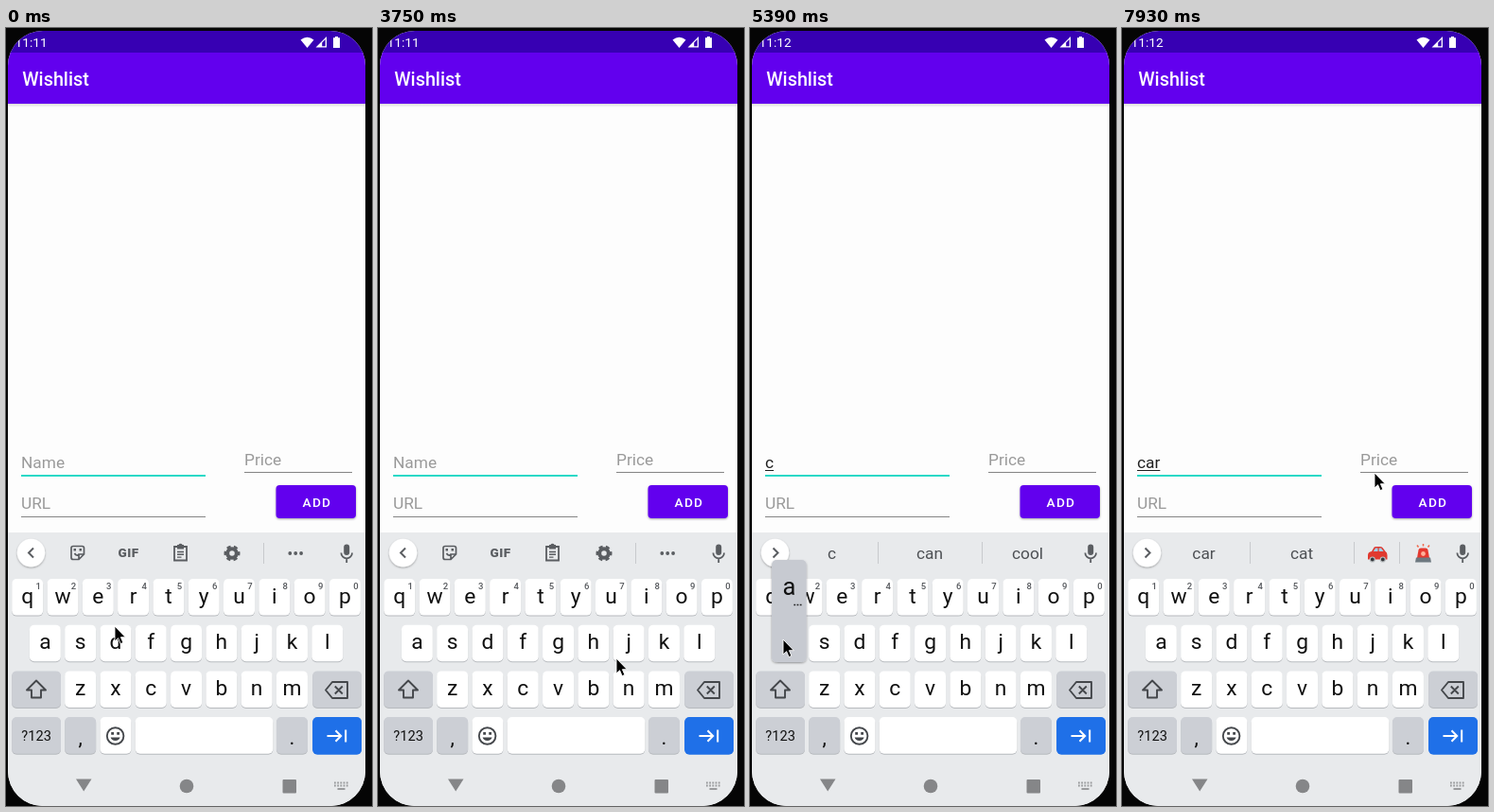
Write an HTML page that moves like this. It is 387 by 822 pixels and loops after 8000 ms.

```html
<!DOCTYPE html>
<html lang="en">
<head>
<meta charset="utf-8">
<title>Wishlist</title>
<style>
  html, body { margin: 0; width: 100%; height: 100%; overflow: hidden; background: #050505; }
  svg { display: block; width: 387px; height: 822px; font-family: Roboto, sans-serif; }
  .hint { fill: #9a9a9a; font-size: 17.3px; }
  .mid { text-anchor: middle; }
  .line { fill: none; stroke: #5a5d61; }
  .solid { fill: #5a5d61; }
  .word { fill: #4d5054; font-size: 17.3px; text-anchor: middle; }
</style>
</head>
<body>
<svg viewBox="0 0 387 822">
  <defs>
    <clipPath id="screen"><rect x="2" y="3" width="378" height="819" rx="37"/></clipPath>
    <linearGradient id="shade" x2="0" y2="1">
      <stop offset="0" stop-color="#000" stop-opacity=".13"/>
      <stop offset="1" stop-color="#000" stop-opacity="0"/>
    </linearGradient>
    <filter id="soft" x="-30%" y="-30%" width="160%" height="160%">
      <feDropShadow dx="0" dy="1" stdDeviation="1.2" flood-opacity=".35"/>
    </filter>
  </defs>
  <rect width="387" height="822" fill="#050505"/>
  <g clip-path="url(#screen)">
    <rect y="3" width="387" height="819" fill="#fdfdfd"/>
    <rect y="80" width="387" height="4" fill="url(#shade)"/>
    <rect y="3" width="387" height="23" fill="#3700b3"/>
    <rect y="26" width="387" height="54" fill="#6200ee"/>
    <g fill="#fff">
      <text id="clock" x="9.5" y="20" font-size="13.7"></text>
      <path d="M311.5 12.4Q318.5 7 325.5 12.4L318.5 21Z"/>
      <path d="M327.5 20.5L339 9V20.5ZM334.2 15.4V19.2H337.7V12Z" fill-rule="evenodd"/>
      <path d="M346 10.2H348V9H351V10.2H353V21H346Z"/>
      <text x="17.2" y="61" font-size="19.8" font-weight="500">Wishlist</text>
    </g>

    <g class="hint">
      <text id="nameHint" x="16" y="465">Name</text>
      <text x="252" y="462">Price</text>
      <text x="16" y="508">URL</text>
    </g>
    <text id="typed" x="16" y="465" font-size="17.3" fill="#202020"></text>
    <rect id="under" x="16" y="467" height="1" fill="#202020"/>
    <rect x="16" y="472" width="195" height="2" fill="#2bd9c7"/>
    <path d="M252 469.5H366M16 516.5H211" stroke="#858585"/>
    <rect id="caret" y="446" width="2" height="24" fill="#2bd0be"/>
    <rect x="285.5" y="483" width="84.5" height="35" rx="4" fill="#6200ee" filter="url(#soft)"/>
    <text x="313.6" y="506" font-size="13.7" font-weight="500" letter-spacing="1.2" fill="#fff">ADD</text>

    <rect y="533" width="387" height="289" fill="#e8eaec"/>
    <g id="toolbar">
      <path class="line" d="M77 561.5H71Q69 561.5 69 559.5V549.5Q69 547.5 71 547.5H80.5Q82.5 547.5 82.5 549.5V556ZV556H82.5M72.5 555Q74.5 558.5 77.5 556" stroke-width="1.7"/>
      <path class="solid" d="M71.5 550H74V552.5H71.5ZM77.5 550H80V552.5H77.5Z"/>
      <text class="solid mid" x="129.6" y="559" font-size="13.5" font-weight="900" letter-spacing=".5">GIF</text>
      <path class="line" d="M178 548H191V562.5H178Z" stroke-width="1.8"/>
      <path class="solid" d="M181 546H182.5A2.2 2.2 0 0 1 186.5 546H188V550.5H181Z"/>
      <path class="line" d="M181 553.5H188M181 556.3H188M181 559.1H185.5" stroke-width="1.4"/>
      <circle class="line" cx="239" cy="555" r="4.8" stroke-width="4"/>
      <circle class="line" cx="239" cy="555" r="7.2" stroke-width="2.6" stroke-dasharray="4.2 3.34" stroke-dashoffset="2.1"/>
      <path d="M272.5 544V566" stroke="#c8cacd"/>
      <path class="line" d="M300.3 555H313" stroke-width="3.8" stroke-linecap="round" stroke-dasharray="0 5.9"/>
    </g>
    <g id="words"></g>
    <circle cx="26.5" cy="554.5" r="14.7" fill="#fff" filter="url(#soft)"/>
    <path id="chevron" class="line" d="M24.5 549.5L29.5 554.5L24.5 559.5" stroke-width="2"/>
    <rect class="solid" x="357.2" y="545.5" width="6" height="11.5" rx="3"/>
    <path class="line" d="M354.4 554.5A5.8 5.8 0 0 0 366 554.5M360.2 560.5V565" stroke-width="1.8"/>

    <g id="keys"></g>
    <g fill="none" stroke="#44474b" stroke-width="1.9" stroke-linejoin="round">
      <path d="M32 689.5L42 699.5H37V707.5H27V699.5H22Z"/>
      <path d="M345 691H361V708H345L338 699.5ZM347.8 695.5L355.8 703.5M355.8 695.5L347.8 703.5"/>
      <circle cx="115.6" cy="748" r="8.8"/>
    </g>
    <path d="M111.2 744H114V746.8H111.2ZM117.2 744H120V746.8H117.2ZM110.6 749.6H120.6A5.2 4.8 0 0 1 110.6 749.6Z" fill="#44474b"/>
    <path d="M339.5 748H354M348.5 742.3L354.2 748L348.5 753.7M359.2 741.5V754.5" fill="none" stroke="#fff" stroke-width="2"/>

    <g fill="#858688">
      <path d="M74 793.5H90.5L82.2 806.5Z"/>
      <circle cx="191" cy="801" r="7.3"/>
      <rect x="292.5" y="794" width="14.5" height="14.5" rx="1"/>
    </g>
    <g stroke="#9a9b9d" stroke-width="1.8">
      <path d="M347 797.5H362M347 800.5H362" stroke-dasharray="1.8 1.4"/>
      <path d="M350.5 804H358.5"/>
    </g>

    <g id="popup">
      <rect x="-18.3" width="36.6" height="108" rx="5" fill="#c7cad1" filter="url(#soft)"/>
      <text id="popLetter" class="mid" y="37" font-size="25.5" fill="#101010"></text>
      <path d="M5 47.5H13.4" stroke="#222" stroke-width="1.6" stroke-dasharray="1.8 1.4"/>
    </g>
  </g>
  <path id="mouse" d="M0 0V16L3.6 12.7L6.1 18.6L8.9 17.4L6.4 11.7H11.3Z" stroke="#fff" stroke-width=".9"/>
</svg>
<script>
const $ = id => document.getElementById(id);
const LOOP = 8000, FRAME = 149.5;   // the screen refreshes once per FRAME ms
const LEFT = 6.2, PITCH = 37.3, TOP = 582, ROW = 48.7, KEY = 33;
const rows = ['qwertyuiop', 'asdfghjkl', 'zxcvbnm'];
const indent = [0, 0.5, 1.5];

// Pointer rests: refresh number, x, y
const path = [
  [0, 115, 632], [3, 189, 632], [8, 107, 636], [10, 107, 636], [15, 161, 656],
  [18, 163, 656], [21, 254, 644], [24, 300, 652], [30, 142, 697], [32, 142, 697],
  [36, 35, 646], [37, 35, 646], [41, 139, 600], [47, 139, 600], [50, 257, 483],
  [52, 257, 483], [53, 267, 470]
];

const typing = 'car', presses = [30, 36, 46];

const word = (x, s, weight = 400) =>
  `<text class="word" x="${x}" y="561" font-weight="${weight}">${s}</text>`;
const bar = x => `<path d="M${x}.5 543V566" stroke="#c8cacd"/>`;
const pair = (a, b, weight) => word(86.5, a) + bar(135) + word(190, b, weight) + bar(245);

const tin = `<path d="M288 549V563Q294.5 568 301 563V549Z" fill="#f0b93a"/>
  <path d="M288 553Q294.5 557 301 553V560Q294.5 564 288 560Z" fill="#f7d774"/>
  <circle cx="294.5" cy="559" r="2.2" fill="#d8402f"/>
  <path d="M288 563Q294.5 567.5 301 563" fill="none" stroke="#aeb4b8" stroke-width="1.6"/>
  <ellipse cx="294.5" cy="548.5" rx="6.7" ry="2.7" fill="#c3c8cb" stroke="#8f979b" stroke-width=".8"/>`;
const car = `<path d="M260 557Q260 553.5 264 553L266.5 548.8Q267 548 268.5 548H273Q274.5 548 275.5 549L278.5 553Q280.5 554 280.5 557V561.5H260Z" fill="#e0392f"/>
  <path d="M265.8 553L268 549.5H270.5V553ZM271.7 549.5H274L276.7 553H271.7Z" fill="#9fd0e8"/>
  <g fill="#36393d" stroke="#b8bdc0" stroke-width="1.2"><circle cx="264.8" cy="561.5" r="2.5"/><circle cx="275.8" cy="561.5" r="2.5"/></g>`;
const siren = `<path d="M312 560L313.5 551.5Q314 549.5 316 549.5H321Q323 549.5 323.5 551.5L325 560Z" fill="#e5392f"/>
  <circle cx="318.5" cy="555.5" r="2.4" fill="#ffb09a"/>
  <path d="M311 559.5H326L327 564.5H310Z" fill="#6d7880"/>
  <path d="M318.5 545V547.5M312 546.5L313.5 548.5M325 546.5L323.5 548.5" stroke="#f06a4e" stroke-width="1.5"/>`;

// Suggestion strip by number of letters typed
const strips = [
  '',
  pair('c', 'can') + word(293.5, 'cool'),
  pair('ca', 'can', 700) + tin,
  pair('car', 'cat') + car + bar(293) + siren
];

const keyLeft = (row, i) => LEFT + (indent[row] + i) * PITCH;

function key(x, row, w, fill, label = '', size = 22.8, base = 26, edge = '#b7babe') {
  const y = TOP + row * ROW;
  const cap = (top, color) =>
    `<rect x="${x}" y="${top}" width="${w}" height="38.6" rx="5" fill="${color}"/>`;
  return cap(y + 1, edge) + cap(y, fill) +
    `<text class="mid" x="${x + w / 2}" y="${Math.floor(y + base)}" font-size="${size}" fill="#101010">${label}</text>`;
}

function buildKeys() {
  const grey = '#cccfd5', white = '#fff', blue = '#1f70e8', wide = 51.8, right = 324.2;
  let out = '';
  rows.forEach((set, row) => [...set].forEach((ch, i) => {
    out += key(keyLeft(row, i), row, KEY, white, ch);
  }));
  for (let i = 0; i < 10; i++) {
    out += `<text class="mid" x="${keyLeft(0, i) + 28}" y="593" font-size="9.5" font-weight="500" fill="#55585c">${(i + 1) % 10}</text>`;
  }
  const low = n => LEFT + (n + 0.5) * PITCH;
  out += key(LEFT, 2, wide, grey) + key(right, 2, wide, grey);
  out += key(LEFT, 3, wide, grey, '?123', 14.6, 25) + key(low(1), 3, KEY, grey, ',', 22, 29);
  out += key(low(2), 3, KEY, white) + key(low(3), 3, 145.6, white);
  out += key(low(7), 3, KEY, grey, '.', 22, 29) + key(right, 3, wide, blue, '', 0, 0, blue);
  $('keys').innerHTML = out;
}

const show = (id, on) => $(id).setAttribute('visibility', on ? 'visible' : 'hidden');
let shown = -1;

function setTyped(n) {
  shown = n;
  $('words').innerHTML = strips[n];
  $('typed').textContent = typing.slice(0, n);
  const width = n ? $('typed').getComputedTextLength() : 0;
  $('under').setAttribute('width', width);
  $('caret').setAttribute('x', 16 + width);
  $('chevron').setAttribute('transform', n ? '' : 'translate(53.5) scale(-1 1)');
  show('toolbar', !n);
  show('nameHint', !n);
}

function pointer(f) {
  const next = path.findIndex(p => p[0] > f);
  if (next < 0) return path.at(-1).slice(1);
  const [f0, x0, y0] = path[next - 1], [f1, x1, y1] = path[next];
  const p = (f - f0) / (f1 - f0), e = p * (2 - p);
  return [x0 + (x1 - x0) * e, y0 + (y1 - y0) * e].map(Math.round);
}

function drawPopup(f) {
  const n = presses.indexOf(f);
  show('popup', n >= 0);
  if (n < 0) return;
  const ch = typing[n], row = rows.findIndex(set => set.includes(ch));
  const x = keyLeft(row, rows[row].indexOf(ch)) + KEY / 2;
  $('popup').setAttribute('transform', `translate(${x} ${Math.floor(TOP + row * ROW - 68)})`);
  $('popLetter').textContent = ch;
}

function draw(time) {
  const f = Math.floor(time % LOOP / FRAME);
  const n = presses.filter(p => p < f).length;
  if (n !== shown) setTyped(n);

  // The caret blinks each half second, starting anew with every letter
  const since = f - (n ? presses[n - 1] + 1 : 1);
  show('caret', since >= 0 && (since * 150 + 60) % 1000 < 500);
  $('mouse').setAttribute('transform', `translate(${pointer(f)})`);
  $('clock').textContent = f < 26 ? '11:11' : '11:12';
  drawPopup(f);
}

buildKeys();
const start = performance.now();
function tick() {
  draw(performance.now() - start);
  requestAnimationFrame(tick);
}
tick();
</script>
</body>
</html>
```
